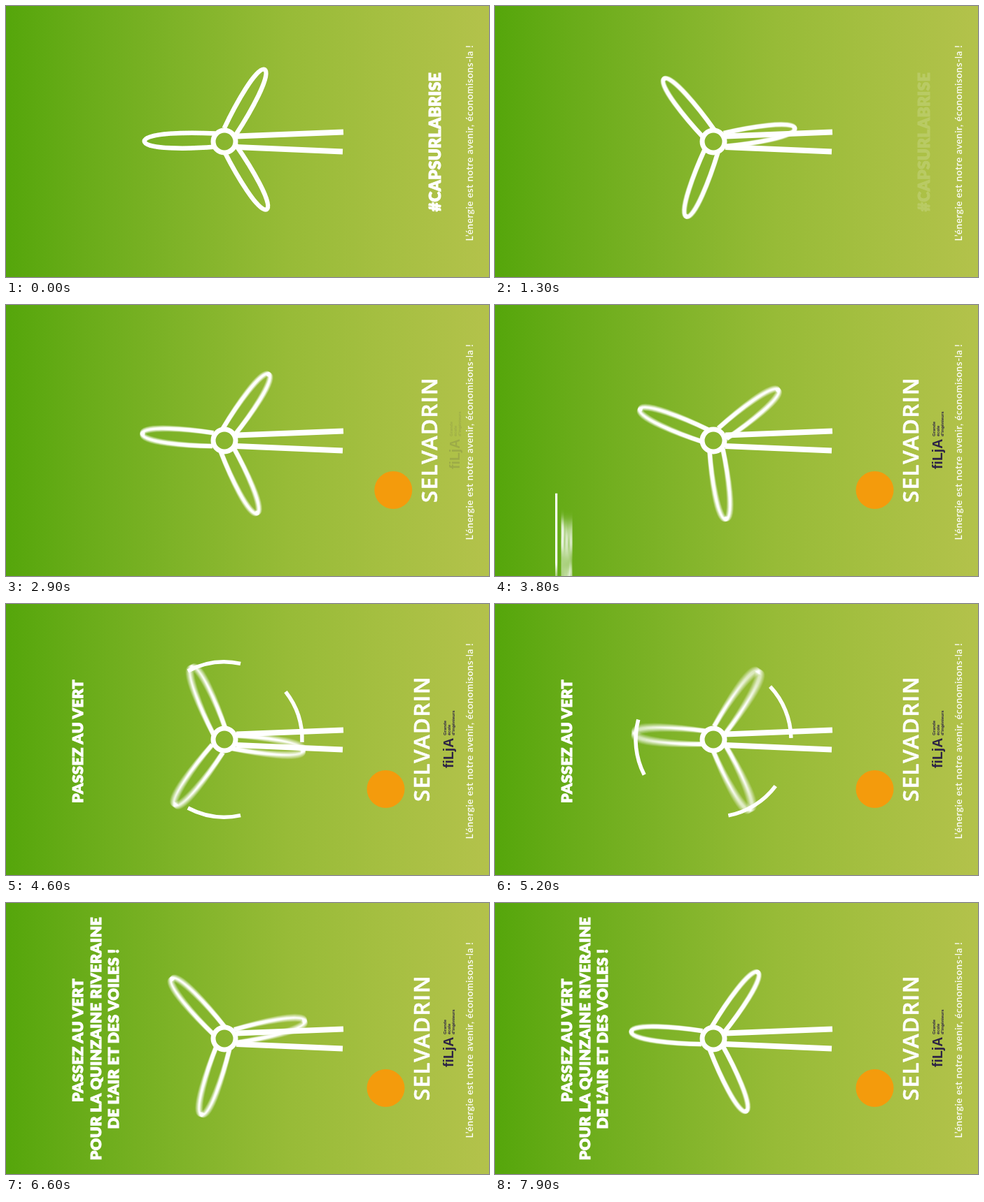
Write an HTML page with a canvas that moves like this. It is 690 px wide and 388 px high and loops after 8 s.

```html
<!DOCTYPE html>
<html lang="fr">
<head>
<meta charset="utf-8">
<title>Passez au vert</title>
<style>
  html, body { margin: 0; width: 100%; height: 100%; overflow: hidden; }
  body {
    position: relative;
    background: linear-gradient(90deg, #55a60b 0, #69ac19 16%, #7fb328 36%, #97bb37 58%, #a5bf41 78%, #b3c24b 100%);
  }
  canvas, svg { position: absolute; left: 0; top: 0; width: 690px; height: 388px; }
  text { fill: #fff; font-family: Lato, "Open Sans", sans-serif; }
  .head {
    font-weight: 900; font-size: 21.4px; letter-spacing: .5px; text-anchor: middle;
    stroke: #fff; stroke-width: 1.1px;
  }
  .hash { font-size: 22.5px; }
  .tag { font-size: 13.5px; letter-spacing: .62px; stroke: #fff; stroke-width: .2px; }
  .brand { font: 600 31px "Open Sans", sans-serif; letter-spacing: 1.6px; stroke: #fff; stroke-width: .6px; }
  .school text { fill: #2d2346; font-family: "Liberation Sans", Arial, sans-serif; font-weight: 700; }
  .school .name { font-size: 19.5px; }
  .school .note { font-size: 6px; }
</style>
</head>
<body>
<canvas id="mill" width="690" height="388"></canvas>
<svg viewBox="0 0 690 388">
  <defs>
    <filter id="smear1" filterUnits="userSpaceOnUse" x="0" y="-40" width="690" height="470"><feGaussianBlur stdDeviation="0"/></filter>
    <filter id="smear2" filterUnits="userSpaceOnUse" x="0" y="-40" width="690" height="470"><feGaussianBlur stdDeviation="0"/></filter>
    <linearGradient id="tail" x1="0" y1="0" x2="0" y2="1">
      <stop offset="0" stop-color="#fff"/>
      <stop offset=".75" stop-color="#fff"/>
      <stop offset="1" stop-color="#fff" stop-opacity="0"/>
    </linearGradient>
  </defs>

  <text class="tag" transform="translate(667 336.5) rotate(-90)">L’énergie est notre avenir, économisons-la !</text>
  <text id="hash" class="head hash" transform="translate(621 194.5) rotate(-90)">#CAPSURLABRISE</text>

  <g id="brand">
    <circle cx="542.5" cy="265" r="27" fill="#f49b0c"/>
    <text class="brand" transform="translate(605 283) rotate(-90)">SELVADRIN</text>
  </g>

  <g id="school" class="school">
    <text class="name" transform="translate(638.5 235) rotate(-90)">fiLjA</text>
    <g transform="translate(629 188) rotate(-90)">
      <text class="note">Grande</text>
      <text class="note" y="6">école</text>
      <text class="note" y="12">d’ingénieurs</text>
    </g>
  </g>

  <g id="blur1"><g id="head1">
    <text class="head" transform="translate(110 196.5) rotate(-90)">PASSEZ AU VERT</text>
  </g></g>
  <g id="blur2"><g id="head2">
    <text class="head" transform="translate(135.5 194) rotate(-90)">POUR LA QUINZAINE RIVERAINE</text>
    <text class="head" transform="translate(161 194.5) rotate(-90)">DE L’AIR ET DES VOILES !</text>
  </g></g>

  <rect id="gustA" x="86" width="3.2" height="132" fill="url(#tail)"/>
  <rect id="gustB" x="121" width="3.2" height="110" fill="url(#tail)"/>
</svg>

<script>
const LOOP = 8000, STEP = 100, SHUTTER = 15;
const HUB = { x: 312, y: 194 };
const $ = id => document.getElementById(id);
const ctx = $('mill').getContext('2d');
const clamp = (v, a = 0, b = 1) => Math.min(b, Math.max(a, v));
const ramp = (t, from, to) => clamp((t - from) / (to - from));
const easeOut = u => 1 - (1 - u) ** 3;
const rad = deg => deg * Math.PI / 180;

// time, rotor angle in degrees, speed in degrees per ms
const SPIN = [
  [0, 0, 0], [900, 25, .055], [1300, 51.6, .08], [2900, 245.6, .145],
  [4600, 547.7, .25], [5800, 918.8, .31], [6600, 1128.5, .205], [7900, 1325.6, .1], [8000, 1335, .09]
];
// centre angles of the three gust arcs at 4600 ms
const ARCS = [-98, -18, 98];

const BLADE = new Path2D('M14,-9.5 C50,-12 115,-12.5 115.5,0 C115,12.5 50,12 14,9.5');
const FIRST_BLADE = -60.8;
const OFF_CENTRE = 2.4; // the rotor sits slightly off its axis, towards the first blade

// Cubic Hermite interpolation through SPIN
function rotor(t) {
  let i = 0;
  while (i < SPIN.length - 2 && t >= SPIN[i + 1][0]) i++;
  const [t0, p0, v0] = SPIN[i], [t1, p1, v1] = SPIN[i + 1];
  const d = t1 - t0, u = (t - t0) / d, w = 1 - u;
  return (1 + 2 * u) * w * w * p0 + u * w * w * d * v0
       + u * u * (3 - 2 * u) * p1 - u * u * w * d * v1;
}

function drawBlades(t) {
  const samples = 15;
  const angle = rotor(t) + FIRST_BLADE;
  const speed = (rotor(t + 5) - rotor(Math.max(0, t - 5))) / 10;
  const spread = speed * SHUTTER;
  ctx.globalCompositeOperation = 'lighter';
  ctx.globalAlpha = 1 / samples;
  ctx.lineWidth = 6.5;
  for (let s = 0; s < samples; s++) {
    ctx.save();
    ctx.rotate(rad(angle + spread * (s / (samples - 1) - .5)));
    ctx.translate(OFF_CENTRE, 0);
    for (let b = 0; b < 3; b++) {
      ctx.stroke(BLADE);
      ctx.rotate(rad(120));
    }
    ctx.restore();
  }
  ctx.globalCompositeOperation = 'source-over';
  ctx.globalAlpha = 1;
}

function drawArcs(t) {
  const size = (40 * easeOut(ramp(t, 3800, 4500)) + 4 * ramp(t, 4600, 5800)) * (1 - ramp(t, 5900, 6500));
  if (size < .5) return;
  const turn = (t - 4600) * .1265;
  ctx.lineWidth = 5.5;
  for (const a of ARCS) {
    ctx.beginPath();
    ctx.arc(0, 0, 111, rad(a + turn - size / 2), rad(a + turn + size / 2));
    ctx.stroke();
  }
}

function drawMill(t) {
  ctx.setTransform(1, 0, 0, 1, 0, 0);
  ctx.clearRect(0, 0, 690, 388);
  ctx.translate(HUB.x, HUB.y);
  ctx.strokeStyle = '#fff';
  drawBlades(t);
  drawArcs(t);
  ctx.lineWidth = 8;
  ctx.beginPath();
  ctx.moveTo(17, -7.5); ctx.lineTo(170, -13.5);
  ctx.moveTo(17, 8); ctx.lineTo(169, 14.5);
  ctx.stroke();
  ctx.lineWidth = 7;
  ctx.beginPath();
  ctx.arc(0, 0, 16, 0, 2 * Math.PI);
  ctx.stroke();
}

// Slide a heading up from below, smeared along its path
function slide(n, t, start, time, dist) {
  const left = 1 - ramp(t, start, start + time);
  const speed = left < 1 ? 3 * dist * left * left / time : 0;
  $('head' + n).setAttribute('transform', `translate(0 ${dist * left ** 3})`);
  $('blur' + n).style.visibility = t > start ? 'visible' : 'hidden';
  const sigma = speed * 9;
  if (sigma > .2) {
    $('smear' + n).firstElementChild.setAttribute('stdDeviation', `0 ${sigma}`);
    $('blur' + n).setAttribute('filter', `url(#smear${n})`);
  } else {
    $('blur' + n).removeAttribute('filter');
  }
}

function drawGusts(t) {
  const since = t - (t < 5000 ? 3700 : 5500);
  const top = 388 - since * 1.183;
  const on = since > 0 && since < 800;
  $('gustA').setAttribute('y', top);
  $('gustB').setAttribute('y', top - 131);
  $('gustA').style.visibility = on ? 'visible' : 'hidden';
  $('gustB').style.visibility = on && t > 5000 ? 'visible' : 'hidden';
}

function place(id, dx, alpha) {
  $(id).setAttribute('transform', `translate(${dx} 0)`);
  $(id).style.opacity = alpha;
}

function draw(t) {
  drawMill(t);
  $('hash').style.opacity = 1 - ramp(t, 950, 1400) * 1.08;
  const enter = easeOut(ramp(t, 1500, 2200));
  const settle = easeOut(ramp(t, 2870, 3500));
  place('brand', 12.5 * (1 - settle) + 20 * (1 - enter), enter);
  place('school', 15 * (1 - easeOut(ramp(t, 2800, 3500))), ramp(t, 2830, 3350));
  slide(1, t, 3700, 800, 300);
  slide(2, t, 5500, 900, 435);
  drawGusts(t);
}

const begin = performance.now();
function tick() {
  const t = (performance.now() - begin) % LOOP;
  draw(Math.floor(t / STEP) * STEP);
  requestAnimationFrame(tick);
}
tick();
</script>
</body>
</html>
```
